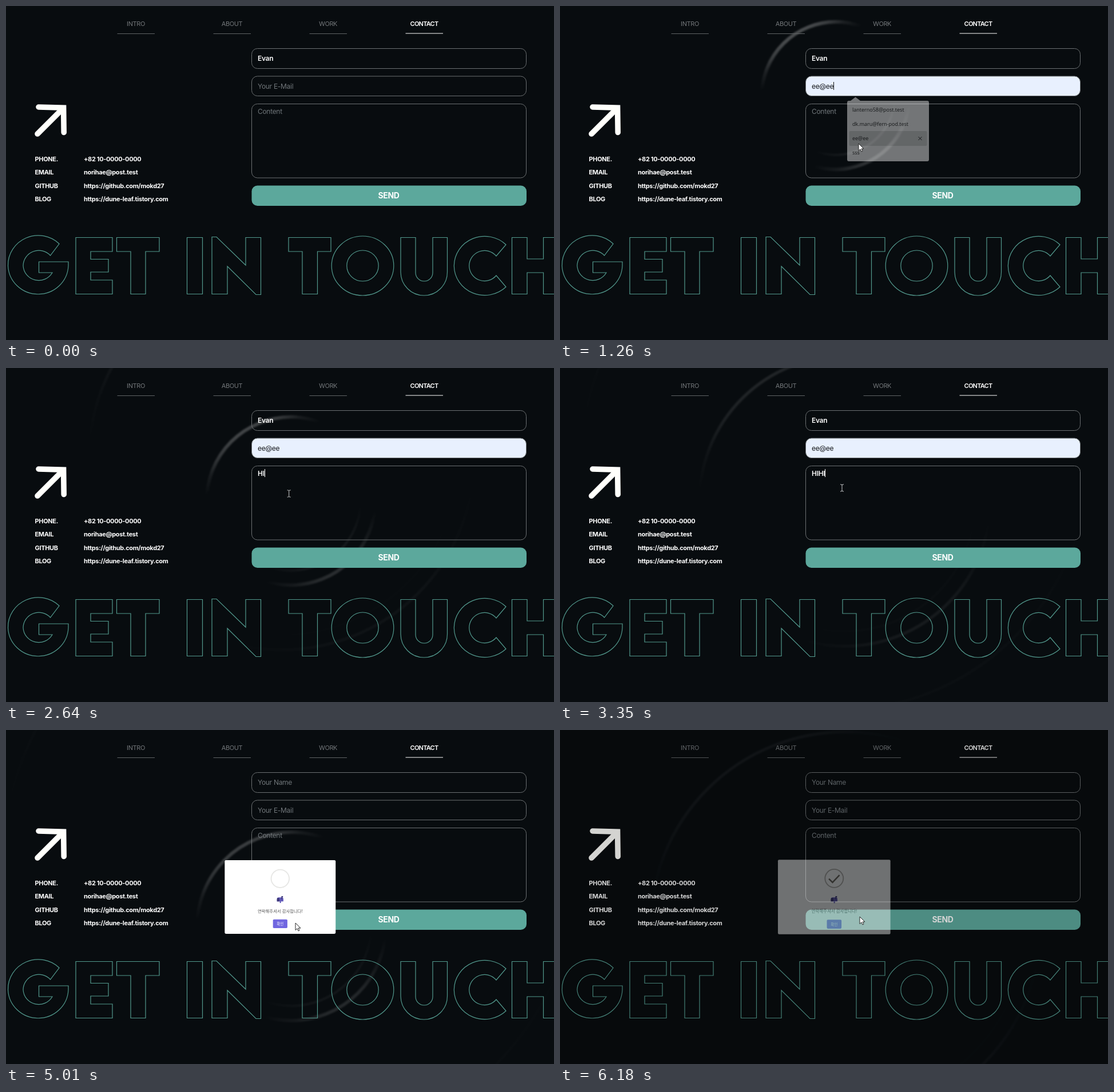
An HTML page for the animation above (6.25 s loop, 958 by 585 pixels).

```html
<!DOCTYPE html>
<html lang="en">
<head>
<meta charset="utf-8">
<title>Contact</title>
<style>
  html, body { margin: 0; width: 100%; height: 100%; overflow: hidden; background: #080c0f; }
  svg { display: block; width: 958px; height: 585px; overflow: hidden;
        font-family: Inter, "Noto Sans CJK KR", sans-serif; }
  text { fill: #fff; white-space: pre; }
  .nav { font-size: 11px; letter-spacing: -.4px; text-anchor: middle; fill: #73777a; }
  .nav.on { fill: #fff; font-weight: 600; letter-spacing: -.75px; }
  .info { font-size: 11px; font-weight: 700; letter-spacing: -.35px; }
  .field { fill: none; stroke: #6c7072; }
  .hint, .value { font-size: 12px; letter-spacing: -.3px; }
  .hint { fill: #70767a; }
  .value { font-weight: 600; }
  #email { fill: #15181c; font-weight: 400; }
  .item { font: 9px "Open Sans", "Noto Sans", sans-serif; fill: #222; }
  #rings circle { fill: none; filter: url(#soft); }
</style>
</head>
<body>
<svg viewBox="0 0 958 585">
  <defs>
    <filter id="soft"><feGaussianBlur stdDeviation="1.5"/></filter>
    <linearGradient id="shine" x1=".2275" y1=".0805" x2=".7725" y2=".9195">
      <stop offset="0" stop-color="#fff"/>
      <stop offset=".05" stop-color="#fff" stop-opacity=".75"/>
      <stop offset=".11" stop-color="#fff" stop-opacity=".3"/>
      <stop offset=".2" stop-color="#fff" stop-opacity="0"/>
      <stop offset=".82" stop-color="#fff" stop-opacity="0"/>
      <stop offset=".93" stop-color="#fff" stop-opacity=".25"/>
      <stop offset="1" stop-color="#fff" stop-opacity=".6"/>
    </linearGradient>
    <linearGradient id="echo" x1=".2275" y1=".0805" x2=".7725" y2=".9195">
      <stop offset=".8" stop-color="#fff" stop-opacity="0"/>
      <stop offset="1" stop-color="#fff"/>
    </linearGradient>
  </defs>

  <g id="rings"></g>
  <g id="nav"></g>

  <g fill="none" stroke="#fffffb" stroke-width="9.6" stroke-linecap="round">
    <path d="M57 177 100.6 178.2 101.2 221.5M55 224 99 180"/>
  </g>
  <g id="info"></g>

  <g id="title" fill="none" stroke="#52998d" stroke-width="1.2">
    <path d="M93 416.500A52.800 52 0 0 0 3.500 455 52.800 52 0 0 0 109 455V448H57.500V467H81A27.300 27 0 0 1 30 455 27.300 27 0 0 1 77.500 437Z"/>
    <path d="M122 405.500H186V430H148V443.500H179V466H148V480H186V504.500H122Z"/>
    <path d="M193.500 405.500H268V430H244V504.500H218V430H193.500Z"/>
    <path d="M316.500 405.500H343.500V504.500H316.500Z"/>
    <path d="M360 504.500V404.500H368L419 454V405.500H445.500V505.500H437L387 456V504.500Z"/>
    <path d="M494 405.500H568V430H544.500V504.500H518V430H494Z"/>
    <ellipse cx="623.500" cy="455" rx="54.300" ry="52"/>
    <ellipse cx="623.500" cy="455" rx="27.700" ry="27"/>
    <path d="M690 405.500H716V467A15 15 0 0 0 746 467V405.500H771.500V466A40.750 41 0 0 1 690 466Z"/>
    <path d="M874 418A53.500 52 0 0 0 783.300 455 53.500 52 0 0 0 874 492L857 472A26.800 27 0 0 1 809.700 455 26.800 27 0 0 1 857 438Z"/>
    <path d="M884.500 405.500H911V443H939.500V405.500H966V504.500H939.500V467H911V504.500H884.500Z"/>
  </g>

  <rect id="autofill" x="429.500" y="123" width="480" height="34.500" rx="10" fill="#e8f0fe"/>
  <rect class="field" x="429.500" y="74.500" width="480" height="35" rx="10"/>
  <rect class="field" x="429.500" y="123" width="480" height="34.500" rx="10"/>
  <rect class="field" x="429.500" y="171.500" width="480" height="129.500" rx="10"/>
  <text class="hint" id="nameHint" x="440" y="96">Your Name</text>
  <text class="hint" id="emailHint" x="440" y="144.500">Your E-Mail</text>
  <text class="hint" id="noteHint" x="440" y="188.500">Content</text>
  <text class="value" id="name" x="440" y="96">Evan</text>
  <text class="value" id="email" x="440" y="144.500">ee@ee</text>
  <text class="value" id="note" x="440" y="188.500"></text>
  <rect id="caret" width="1" height="14"/>

  <rect x="429.500" y="314.500" width="480.500" height="35.500" rx="10" fill="#5ca89c"/>
  <text x="669" y="337" text-anchor="middle" font-size="14" font-weight="700" letter-spacing="-.35">SEND</text>

  <g id="suggest">
    <path d="M505 166H508L516.500 159.500 525 166H642Q645 166 645 169V269Q645 272 642 272H505Q502 272 502 269V169Q502 166 505 166Z" fill="#fff"/>
    <rect id="hover" x="505.500" y="219" width="136" height="26" rx="2" fill="#dcdcdc"/>
    <text class="item" x="511" y="185">lanterno58@post.test</text>
    <text class="item" x="511" y="210">dk.maru@fern-pod.test</text>
    <text class="item" x="511" y="235">ee@ee</text>
    <text class="item" x="511" y="260">sss</text>
    <path id="cross" d="M626.500 229l6 6m0-6l-6 6" stroke="#222" fill="none"/>
  </g>

  <rect id="shade" width="958" height="585"/>
  <g id="dialog">
    <rect x="-138.500" y="-92" width="277" height="184" rx="3" fill="#fff"/>
    <circle id="badge" cy="-46" r="22.500" fill="none" stroke="#6e6961" stroke-width="2.600"/>
    <path id="check" d="M-13-45-4-36 13-54" pathLength="1" stroke-dasharray="1 2" fill="none" stroke="#6e6961" stroke-width="3.500"/>
    <path d="M-8 11V5Q-8 1-4 1H4Q8 1 8 5V11H2V15H-1V11Z" fill="#625ab8"/>
    <path d="M-8 11V5Q-8 2-5 2T-2 5V11ZM3 6V-2H7V1H5V6Z" fill="#3d3779"/>
    <text y="39" text-anchor="middle" font-size="10.500" style="fill:#545454">연락해주셔서 감사합니다!</text>
    <rect x="-18" y="56" width="36" height="22" rx="2.500" fill="#7066e0"/>
    <text y="70.500" text-anchor="middle" font-size="9.300">확인</text>
  </g>

  <g id="pointer">
    <path id="arrow" d="M0 0V12.500L3 9.800 5 14 7 13 5 9H9Z" fill="#fff" stroke="#111" stroke-width=".9"/>
    <path id="beam" d="M-3-6H-1L0-5 1-6H3M0-5V5M-3 6H-1L0 5 1 6H3" fill="none" stroke="#c9cbcc"/>
    <path id="hand" d="M-2-1Q-.500-3 .800-1V4Q2.500 3 3.300 4.600 5 4 5.600 5.500 7.500 5 7.500 7V11L6 15H-1L-5 9Q-5 7-3 8L-2 9Z" fill="#fff" stroke="#111" stroke-width=".7"/>
  </g>
</svg>

<script>
const LOOP = 6250;
const FOCUS_EMAIL = 390, SUGGEST = 480, PREVIEW = 900, ACCEPT = 1190;
const FOCUS_NOTE = 1650, SEND = 3903, DIALOG = 5000, CLOSE = 6094;
const KEYS = [2400, 2550, 2800, 2950];
const WAVE_SPEED = 0.15;

const el = id => document.getElementById(id);
const clamp = v => Math.min(1, Math.max(0, v));
const progress = (t, start, length) => clamp((t - start) / length);
const show = (id, on) => el(id).setAttribute('display', on ? 'inline' : 'none');
const set = (node, attrs) => {
  for (const key in attrs) node.setAttribute(key, attrs[key]);
};

// Values of a list of [time, ...values] at time t.
function follow(t, stops, ease = p => p) {
  const next = stops.findIndex(s => s[0] > t);
  if (next < 0) return stops[stops.length - 1].slice(1);
  if (next === 0) return stops[0].slice(1);
  const a = stops[next - 1], b = stops[next];
  const p = ease((t - a[0]) / (b[0] - a[0]));
  return a.slice(1).map((v, i) => v + (b[i + 1] - v) * p);
}
const smooth = p => p * p * (3 - 2 * p);

el('nav').innerHTML = ['INTRO', 'ABOUT', 'WORK', 'CONTACT'].map((label, i) => {
  const x = 227 + i * 168, on = i === 3;
  return `<text class="nav${on ? ' on' : ''}" x="${x}" y="35">${label}</text>
    <path d="M${x - 32.5} ${on ? 48 : 48.5}h65.500" stroke="${on ? '#fff' : '#5f6365'}" stroke-width="${on ? 1.2 : 1}"/>`;
}).join('');

el('info').innerHTML = [
  ['PHONE.', '+82 10-0000-0000'],
  ['EMAIL', 'norihae@post.test'],
  ['GITHUB', 'https://github.com/mokd27'],
  ['BLOG', 'https://dune-leaf.tistory.com']
].map(([label, value], i) => {
  const y = 272 + i * 23.3;
  return `<text class="info" x="50.500" y="${y}">${label}</text><text class="info" x="136" y="${y}">${value}</text>`;
}).join('');

const waves = [
  { start: FOCUS_EMAIL, x: 482, y: 157 },
  { start: FOCUS_NOTE, x: 498, y: 233 },
  { start: SEND, x: 499, y: 344 }
];
for (const wave of waves) {
  [wave.main, wave.echo] = ['shine', 'echo'].map(paint => {
    const ring = document.createElementNS('http://www.w3.org/2000/svg', 'circle');
    set(ring, { cx: wave.x, cy: wave.y, stroke: `url(#${paint})` });
    return el('rings').appendChild(ring);
  });
}

function drawWaves(t) {
  for (const { start, main, echo } of waves) {
    const front = (t - start) * WAVE_SPEED;
    const width = 5 + 6 * Math.exp(-front / 80);
    const r = Math.max(0, front - width / 2 + 1.5);
    const inner = Math.max(0, front - 27);
    set(main, { r, 'stroke-width': width, opacity: 0.72 * Math.exp(-r / 130) });
    set(echo, { r: inner, 'stroke-width': 4, opacity: 0.5 * Math.exp(-r / 70) });
  }
}

function drawForm(t) {
  const sent = t >= DIALOG;
  const filled = t >= PREVIEW && !sent;
  const typed = sent ? '' : 'HIHI'.slice(0, KEYS.filter(k => k <= t).length);
  show('name', !sent);
  show('nameHint', sent);
  show('autofill', filled);
  show('email', filled);
  show('emailHint', !filled);
  el('note').textContent = typed;
  show('noteHint', !typed);

  const focused = t >= FOCUS_EMAIL && t < SEND;
  const inNote = t >= FOCUS_NOTE;
  const lastInput = Math.max(...[FOCUS_EMAIL, ACCEPT, FOCUS_NOTE, ...KEYS].filter(k => k <= t), 0);
  show('caret', focused && (t - lastInput) % 1000 < 500);
  const width = inNote ? (typed && el('note').getComputedTextLength())
                       : (filled && el('email').getComputedTextLength());
  set(el('caret'), {
    x: 440 + Math.round(width || 0), y: inNote ? 177 : 133,
    fill: !inNote && filled ? '#111' : '#fff'
  });

  show('suggest', t >= SUGGEST && t < 1400);
  el('suggest').setAttribute('opacity', 1 - progress(t, ACCEPT, 125));
  show('hover', t >= PREVIEW);
  show('cross', t >= PREVIEW);
}

function drawDialog(t) {
  const open = t >= DIALOG;
  const closing = progress(t, CLOSE, 150);
  const [grow] = follow(t - DIALOG, [[12, 0.7], [147, 1.05], [252, 0.95], [312, 1]]);
  const scale = grow * (1 - closing / 2);
  const drawn = progress(t, DIALOG + 200, 450);
  show('shade', open);
  el('shade').setAttribute('opacity', 0.4 * progress(t, DIALOG + 12, 100) * (1 - closing));
  show('dialog', open);
  set(el('dialog'), { transform: `translate(479.300 292.500) scale(${scale})`, opacity: 1 - closing });
  el('badge').setAttribute('stroke-opacity', 0.17 + 0.35 * drawn);
  show('check', drawn > 0);
  el('check').setAttribute('stroke-dashoffset', 1 - drawn);
}

const pointerPath = [
  [70, 516, 24], [390, 484, 151], [600, 490, 156], [1000, 522, 241], [1260, 522, 241],
  [1600, 497, 233], [2030, 496, 228], [3350, 493, 210], [3850, 499, 338],
  [4450, 499, 338], [5005, 506, 338], [5950, 508, 338], [6180, 524, 327]
];
const textAreas = [[74, 109], [123, 157], [171, 301]];

function drawPointer(t) {
  const [x, y] = follow(t, pointerPath, smooth);
  const overPanel = t >= DIALOG || (t >= SUGGEST && t < 1400 && y > 160);
  const shape = overPanel ? 'arrow'
    : y >= 315 ? 'hand'
    : textAreas.some(([top, bottom]) => y >= top && y <= bottom) ? 'beam' : 'arrow';
  show('pointer', t >= 70);
  el('pointer').setAttribute('transform', `translate(${x} ${y})`);
  for (const id of ['arrow', 'beam', 'hand']) show(id, id === shape);
}

function draw(t) {
  drawWaves(t);
  drawForm(t);
  drawDialog(t);
  drawPointer(t);
}

const began = performance.now();
function tick() {
  draw((performance.now() - began) % LOOP);
  requestAnimationFrame(tick);
}
tick();
</script>
</body>
</html>
```
